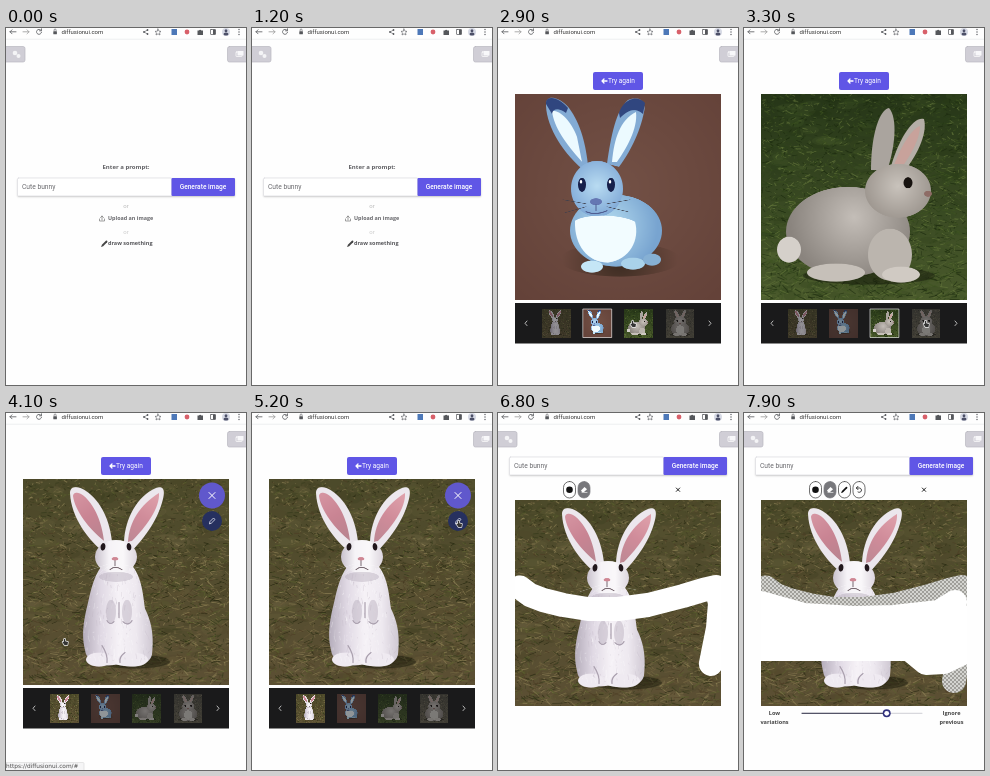
An HTML page with a canvas for the animation above (8 s loop, 240 by 357 pixels).

```html
<!DOCTYPE html>
<html lang="en">
<head>
<meta charset="utf-8">
<title>Image prompt demo</title>
<style>
html, body { margin: 0; width: 100%; height: 100%; overflow: hidden; background: #fff }
canvas { display: block; width: 100vw; height: 100vh }
</style>
</head>
<body>
<canvas id="stage"></canvas>
<script>
const W = 240, H = 357, LOOP = 8000, VIOLET = '#6056e6';
const canvas = document.getElementById('stage');
const ratio = Math.max(1, window.devicePixelRatio || 1);
canvas.width = W * ratio;
canvas.height = H * ratio;
const screen2d = canvas.getContext('2d');
let g = screen2d;

const clamp = v => Math.max(0, Math.min(1, v));
const ramp = (t, a, b) => clamp((t - a) / (b - a));
let seed = 7;
const rnd = () => (seed = seed * 16807 % 2147483647) / 2147483647;

function box(x, y, w, h, fill, r = 0, line) {
  g.beginPath();
  g.roundRect(x, y, w, h, r);
  if (fill) { g.fillStyle = fill; g.fill(); }
  if (line) { g.strokeStyle = line; g.lineWidth = .7; g.stroke(); }
}
function oval(x, y, rx, ry, fill, turn = 0) {
  g.beginPath();
  g.ellipse(x, y, rx, ry, turn, 0, 7);
  g.fillStyle = fill;
  g.fill();
}
function shape(d, fill) {
  g.fillStyle = fill;
  g.fill(new Path2D(d));
}
function line(d, color, width = 1) {
  g.strokeStyle = color;
  g.lineWidth = width;
  g.lineCap = g.lineJoin = 'round';
  g.stroke(new Path2D(d));
}
function text(s, x, y, font, color, align = 'left') {
  g.font = font;
  g.fillStyle = color;
  g.textAlign = align;
  g.textBaseline = 'middle';
  g.fillText(s, x, y);
}
const ui = (size, weight = 400) => `${weight} ${size}px Roboto, sans-serif`;
const bold = size => 'bold ' + size + 'px "Open Sans", sans-serif';

// Pictures are painted once, in the coordinates of the gallery view.
function picture(paint) {
  const c = document.createElement('canvas');
  c.width = c.height = 412;
  g = c.getContext('2d');
  g.scale(2, 2);
  g.translate(-17, -66);
  paint();
  g = screen2d;
  return c;
}
function glow(x, y, r, inner, outer) {
  const f = g.createRadialGradient(x, y, 0, x, y, r);
  f.addColorStop(0, inner);
  f.addColorStop(1, outer);
  return f;
}
function fade(x0, y0, x1, y1, ...colors) {
  const f = g.createLinearGradient(x0, y0, x1, y1);
  colors.forEach((c, i) => f.addColorStop(i / (colors.length - 1), c));
  return f;
}
function strands(count, colors, dx, dy, width) {
  for (let i = 0; i < count; i++) {
    const x = 17 + rnd() * 206, y = 66 + rnd() * 206, near = .6 + (y - 66) / 260;
    g.strokeStyle = colors[Math.floor(rnd() * colors.length)];
    g.lineWidth = width * (.6 + rnd());
    g.beginPath();
    g.moveTo(x, y);
    g.lineTo(x + (rnd() - .5) * dx * near, y + (rnd() - .5) * dy * near);
    g.stroke();
  }
}
function grass(top, bottom, blades) {
  box(17, 66, 206, 206, fade(0, 66, 0, 272, top, bottom));
  g.globalAlpha = .12;
  for (let i = 0; i < 260; i++) {
    oval(17 + rnd() * 206, 66 + rnd() * 206, 5 + rnd() * 9, 2 + rnd() * 4, blades[i % blades.length]);
  }
  g.globalAlpha = .6;
  strands(3600, blades, 15, 8, .7);
  g.globalAlpha = 1;
}

function whiteBunny() {
  grass('#4c4a2a', '#5c5034', ['#25270f', '#343a1a', '#7d7148', '#94875a', '#5b642e', '#4d3c24', '#6d5d3c']);
  oval(128, 249, 36, 7, 'rgba(25,25,10,.5)');
  const body = 'M95 154C88 164 85 176 82 190C78 206 75 222 79 237C80 250 96 255 110 252C126 256 143 254 146 242C148 224 146 210 139 196C137 182 136 166 127 154Z';
  const fur = fade(77, 0, 148, 0, '#b5adbb', '#e0d9e4', '#f6f2f7', '#eee9f0', '#cdc6d1');
  shape('M101 142C82 128 65 104 64 80C64 72 73 73 80 78C95 88 104 108 106 129H118C119 106 131 83 150 75C158 72 159 78 157 86C152 106 141 122 126 138Z', '#ece7ed');
  shape('M98 128C83 116 69 98 67 83C68 77 76 80 81 86C91 97 96 112 98 128Z', fade(68, 80, 98, 128, '#d695a2', '#c98493', '#b78590'));
  shape('M122 129C123 109 134 92 153 80C154 95 140 114 126 128Z', fade(153, 80, 122, 129, '#e0a2ac', '#d08c9a', '#bd8894'));
  shape(body, fur);
  oval(110, 144, 21, 17, fade(89, 0, 131, 0, '#c9c2cd', '#f6f3f7', '#faf8fa', '#ddd6df'));
  oval(93, 247, 13, 7, '#efeaf1');
  oval(127, 247, 15, 7, '#efeaf1');
  g.save();
  g.clip(new Path2D(body));
  g.globalAlpha = .35;
  strands(1600, ['#ffffff', '#b9afbe', '#ffffff'], 3, 12, .5);
  g.restore();
  oval(110, 164, 17, 5, 'rgba(175,166,180,.4)');
  oval(105, 199, 5, 12, 'rgba(165,156,172,.35)');
  oval(121, 199, 5, 12, 'rgba(165,156,172,.35)');
  line('M101 208Q104 213 108 209M117 209Q122 214 126 208M113 190V205M96 233Q102 242 101 250M119 240Q113 244 114 250', '#aaa0ae', 1.2);
  oval(97, 134, 2.4, 3.8, '#21171c', .15);
  oval(123, 134, 2.3, 3.8, '#21171c', -.15);
  oval(109, 146, 3.3, 1.8, '#cf8794');
  line('M109 148V153M104 157Q109 152 116 157', '#776870', 1);
  line('M103 151L82 158M103 153L86 166M117 152L138 156', 'rgba(255,255,255,.45)', .4);
}
function blueBunny() {
  box(17, 66, 206, 206, glow(120, 160, 150, '#735146', '#644239'));
  oval(122, 232, 60, 17, glow(122, 232, 58, '#382a20', 'rgba(65,45,33,0)'));
  const left = 'M84 141C62 122 47 95 48 74C50 66 63 70 71 80C83 96 88 118 90 138Z';
  const right = 'M109 136C113 108 118 82 130 72C142 67 149 74 146 84C142 105 131 126 121 139Z';
  shape(left, '#83abd4');
  shape(right, '#83abd4');
  shape('M84 134C68 116 56 100 54 83C62 82 73 93 79 109Z', '#ecfaff');
  shape('M114 134C116 111 122 92 138 84C140 101 128 121 119 134Z', '#ecfaff');
  shape('M48 76C47 67 60 68 70 80L68 85C61 80 55 80 54 86Z', '#30467f');
  shape('M121 85C126 70 140 67 147 75L145 86C137 79 130 82 122 90Z', '#30467f');
  oval(118, 203, 46, 36, glow(110, 198, 50, '#b5dcf0', '#78a4d0'));
  oval(99, 161, 26, 28, glow(99, 158, 30, '#b9dcf2', '#82abd8'));
  shape('M77 193C88 186 122 186 137 194C142 212 132 232 110 235C90 235 76 218 77 193Z', '#f2fcff');
  oval(94, 239, 11, 6, '#c5e6f6');
  oval(135, 236, 12, 6, '#a9d2ea');
  oval(154, 232, 9, 6, '#86b0d4');
  oval(84, 157, 4, 7, '#17204a');
  oval(113, 157, 4, 7, '#17204a');
  oval(83, 154, 1.2, 1.8, '#fff');
  oval(112, 154, 1.2, 1.8, '#fff');
  oval(98, 174, 6, 3.5, '#6577b3');
  line('M98 177V183M88 184Q98 188 109 183', '#4e5c90', 1);
  line('M88 176L65 172M88 179L67 185M109 176L132 172M109 179L130 184', '#40404d', .5);
}
function greyBunny() {
  grass('#263618', '#4a5a2c', ['#1a2a0e', '#3f5522', '#66783c', '#2f431a']);
  oval(125, 248, 66, 9, 'rgba(20,25,10,.5)');
  shape('M127 142C127 108 135 82 145 80C154 90 151 120 143 143Z', '#aaa49e');
  shape('M146 142C154 112 169 88 180 91C184 106 172 130 158 146Z', '#b5aea7');
  shape('M150 137C158 116 168 101 176 98C176 112 165 130 156 142Z', '#c8a29b');
  oval(104, 204, 62, 45, glow(110, 190, 65, '#c4beb8', '#8a847e'));
  oval(154, 163, 33, 27, glow(154, 158, 36, '#c9c3bc', '#9c958e'));
  oval(146, 227, 22, 26, '#bbb5ae');
  oval(92, 245, 29, 9, '#c6c0b9');
  oval(157, 247, 19, 8, '#d0cac3');
  oval(45, 222, 12, 13, '#d5d0ca');
  oval(164, 155, 4.5, 5.5, '#17120f');
  oval(184, 166, 4, 3, '#8e6c66');
}
function sittingBunny() {
  grass('#4a483e', '#605b4a', ['#30312a', '#75705c', '#545346', '#827a64']);
  oval(122, 250, 72, 12, 'rgba(20,20,15,.5)');
  shape('M108 132C80 116 76 86 84 72C102 80 116 108 119 134Z', '#a39d97');
  shape('M127 132C128 104 144 80 160 72C167 94 155 118 139 138Z', '#a39d97');
  shape('M107 124C90 112 84 92 88 82C101 92 110 110 112 126Z', '#bba09a');
  shape('M133 126C135 108 147 92 157 83C159 101 148 117 139 130Z', '#bba09a');
  oval(122, 210, 66, 52, glow(122, 198, 68, '#bab4ad', '#7d7771'));
  oval(122, 155, 42, 36, glow(122, 152, 44, '#c2bcb6', '#938d87'));
  oval(122, 218, 30, 34, '#cdc8c1');
  oval(96, 250, 23, 10, '#c5bfb8');
  oval(148, 250, 23, 10, '#c5bfb8');
  oval(101, 151, 5.5, 7.5, '#17120f');
  oval(143, 151, 5.5, 7.5, '#17120f');
  oval(122, 170, 6, 4, '#8e6c66');
}
const pictures = [whiteBunny, blueBunny, greyBunny, sittingBunny].map(picture);

const tile = document.createElement('canvas');
tile.width = tile.height = 4;
g = tile.getContext('2d');
box(0, 0, 4, 4, '#d4d4d0');
box(0, 0, 2, 2, '#a09f9a');
box(2, 2, 2, 2, '#a09f9a');
g = screen2d;
const checker = g.createPattern(tile, 'repeat');

function brushStroke(points, k, color) {
  if (k <= 0) return;
  let length = 0;
  g.beginPath();
  points.forEach(([x, y], i) => {
    g.lineTo(x, y);
    if (i) length += Math.hypot(x - points[i - 1][0], y - points[i - 1][1]);
  });
  g.save();
  g.lineWidth = 24;
  g.lineCap = g.lineJoin = 'round';
  g.strokeStyle = color;
  g.setLineDash([length * k, 2 * length]);
  g.stroke();
  g.restore();
}
const firstStroke = [[22, 174.5], [32, 182], [45, 187], [65, 192], [90, 196], [120, 196], [150, 192], [185, 183], [205, 177], [218, 174], [222, 190], [220, 215], [213, 250], [210, 268]];
const secondStroke = [[211, 189], [195, 199], [150, 204], [110, 205], [60, 202], [17, 190], [17, 214], [120, 216], [223, 205], [223, 226], [120, 236], [17, 236], [165, 236], [182, 250], [200, 249], [223, 238]];

function pencil(x, y, color) {
  line(`M${x - 2} ${y + 2}L${x + 2} ${y - 2}`, color, 1.8);
  line(`M${x - 3} ${y + 3}L${x - 2} ${y + 2}`, color, .8);
}
function cross(x, y, r, color) {
  line(`M${x - r} ${y - r}L${x + r} ${y + r}M${x + r} ${y - r}L${x - r} ${y + r}`, color, 1);
}

function browserBar() {
  const ink = '#55575b';
  line('M10 3.8H4M6 1.8L4 3.8L6 5.8', ink, .8);
  line('M17 3.8H23M21 1.8L23 3.8L21 5.8', '#999', .8);
  line('M35 2.3A2.5 2.5 0 1 0 35.5 4.3M35.5 .8V2.8H33.5', ink, .8);
  box(47.3, 3.3, 3.6, 3, ink, .5);
  line('M48.1 3V2A1 1 0 0 1 50.1 2V3', ink, .6);
  text('diffusionui.com', 55.5, 4.1, ui(6), '#333');
  line('M141.5 2L138 4L141.5 6', ink, .6);
  [[141.5, 2], [138, 4], [141.5, 6]].forEach(([x, y]) => oval(x, y, .9, .9, ink));
  line('M152 1L153 3.2L155 3.4L153.5 4.8L154 7L152 5.8L150 7L150.5 4.8L149 3.4L151 3.2Z', ink, .6);
  box(165.5, 1, 5.5, 6, '#4d78b8');
  oval(181, 4, 2.4, 2.4, '#d8606a');
  shape('M191.5 2.5H193A1.2 1.2 0 0 1 195.3 2.5H197V7H191.5Z', ink);
  box(204.5, 1.5, 5, 5, null, .5, ink);
  box(207, 1.5, 2.5, 5, ink);
  oval(220, 4, 4, 4, '#d7dae5');
  oval(220, 2.8, 1.4, 1.5, '#4c5068');
  oval(220, 6, 2.5, 1.5, '#4c5068');
  [1.5, 4, 6.5].forEach(y => oval(233, y, .7, .7, ink));
  box(0, 10.8, W, .7, '#e8e9eb');
}
function cornerButtons(withLeft) {
  const fill = '#d0ced6', rim = '#b9b8c0';
  if (withLeft) {
    box(-3, 18.5, 22, 15.5, fill, 2, rim);
    oval(9, 25, 2.3, 2.3, '#f4f4f6');
    oval(12.5, 28, 2, 2, '#f4f4f6');
  }
  box(221.5, 18.5, 22, 15.5, fill, 2, rim);
  box(230, 24, 6, 4.5, null, .5, '#fff');
  box(231.5, 23, 6, 4.5, '#f8f8fa', .5);
}
function promptField(y) {
  g.save();
  g.shadowColor = 'rgba(0,0,0,.22)';
  g.shadowBlur = 2 * ratio;
  g.shadowOffsetY = ratio;
  box(11.5, y, 217.5, 18, '#fff', 1);
  g.restore();
  box(11.5, y, 154, 18, '#fff', 1, '#dcdce0');
  box(165.5, y, 63.5, 18, VIOLET, 1);
  text('Cute bunny', 16, y + 9, ui(6.7), '#6a6a6e');
  text('Generate image', 197, y + 9, ui(6.6, 500), '#fff', 'center');
}
function promptPage() {
  cornerButtons(true);
  text('Enter a prompt:', 120, 139, bold(6), '#606064', 'center');
  promptField(150);
  text('or', 120, 178, ui(6), '#bbb', 'center');
  line('M93.5 191V193H98.5V191M96 192V188M94.5 189.5L96 188L97.5 189.5', '#777', .7);
  text('Upload an image', 102, 191, bold(5.4), '#66666a');
  text('or', 120, 204, ui(6), '#ccc', 'center');
  pencil(98.5, 215.5, '#444');
  text('draw something', 102, 216, bold(5.5), '#555559');
}
function galleryPage(t) {
  cornerButtons(false);
  box(95, 44, 50, 18, VIOLET, 2);
  line('M109 53H104M106 51L104 53L106 55', '#fff', 1.3);
  text('Try again', 110, 53, ui(6.6), '#fff');
  const pick = t < 2500 ? 0 : t < 3050 ? 1 : t < 3400 ? 2 : t < 3700 ? 3 : 0;
  const hover = t >= 2850 && t < 3050 ? 2 : -1;
  g.drawImage(pictures[pick], 17, 66, 206, 205.5);
  box(17, 275, 206, 40.5, '#1a1a1b');
  pictures.forEach((p, i) => {
    const x = 44 + i * 41.2;
    g.globalAlpha = i === pick || i === hover ? 1 : .55;
    g.drawImage(p, x, 281, 28.5, 28.5);
    g.globalAlpha = 1;
    if (i === pick && i) box(x, 281, 28.5, 28.5, null, 0, '#ddd');
  });
  line('M29 293L27 295.3L29 297.6M211 293L213 295.3L211 297.6', '#c9c9c9', .9);
  const k = 1 - (1 - ramp(t, 3850, 4050)) ** 3;
  if (k > 0) {
    oval(206, 82.5, 13 * k, 13 * k, '#6058cc');
    cross(206, 82.5, 3 * k, '#fff');
    oval(206, 108, 10 * k, 10 * k, '#26305f');
    line('M203.5 110.5L204 108.5L207.5 105L209 106.5L205.5 110Z', '#e7e9f5', .8);
  }
  if (t >= 3750 && t < 4450) {
    box(-1, 349.5, 79, 9, '#f5f5f6', 1, '#ddd');
    text('https://diffusionui.com/#', 0, 353.8, '5.85px "DejaVu Sans", sans-serif', '#4a4a4a');
  }
}
function toolButton(i, on) {
  const x = 71.5 + i * 14.5;
  box(x - 6, 68.5, 12, 16.5, on ? '#77777b' : '#fff', 6, on ? '#77777b' : '#333');
  const ink = on ? '#fff' : '#111';
  if (i === 0) oval(x, 76.7, 3.3, 3.3, ink);
  if (i === 1) {
    shape(`M${x - 3} 77.5L${x + .5} 74L${x + 3} 76.2L${x} 79H${x - 2}Z`, ink);
    line(`M${x - 2} 79.5H${x + 3}`, ink, .6);
  }
  if (i === 2) pencil(x, 76.7, ink);
  if (i === 3) line(`M${x - 2.5} 75H${x + .5}A2.2 2.2 0 1 1 ${x - 1} 79M${x - 1} 73.3L${x - 2.7} 75L${x - 1} 76.7`, ink, .8);
}
function editPage(t) {
  const released = t >= 7000;
  cornerButtons(true);
  promptField(44);
  for (let i = 0; i < (released ? 4 : 2); i++) toolButton(i, i === 1 && t >= 6000);
  cross(180, 76.7, 1.7, '#222');
  g.drawImage(pictures[0], 17, 87, 206, 205.5);
  g.save();
  g.beginPath();
  g.rect(17, 87, 206, 205.5);
  g.clip();
  brushStroke(firstStroke, ramp(t, 6250, 6835), released ? checker : '#fff');
  brushStroke(secondStroke, ramp(t, 7100, 7880), '#fff');
  g.restore();
  if (!released) return;
  text('Low', 30.5, 300.5, bold(5.6), '#444', 'center');
  text('variations', 30.5, 310, bold(5.6), '#444', 'center');
  text('Ignore', 207.5, 300.5, bold(5.6), '#444', 'center');
  text('previous', 207.5, 310, bold(5.6), '#444', 'center');
  line('M58 300.3H178', '#c5c5cc', .8);
  line('M58 300.3H140', '#34344c', 1);
  oval(142.7, 300.3, 4, 4, '#30307c');
  oval(142.7, 300.3, 2.4, 2.4, '#fff');
}

// Pointer route: time, x, y
const route = [[1900, 199, 158], [2000, 199, 161], [2450, 100, 293], [2750, 100, 293], [2950, 140, 293], [3300, 181, 293], [3600, 58, 293], [3850, 58, 293], [4100, 58, 226], [4600, 206, 108], [5500, 206, 108], [5850, 84, 77], [6050, 85, 77]];
function pointer(t) {
  const i = route.findIndex(p => p[0] > t);
  if (i < 1) return;
  const [t0, x0, y0] = route[i - 1], [t1, x1, y1] = route[i];
  const k = ramp(t, t0, t1), e = k * k * (3 - 2 * k);
  g.save();
  g.translate(x0 + (x1 - x0) * e, y0 + (y1 - y0) * e);
  const hand = 'M0 0V3L-1 2.5L-1.5 3.2L.5 6H3.5L4 3L1.2 2.2V0Z';
  line(hand, '#eee', 1.4);
  shape(hand, '#333');
  g.restore();
}

function draw(t) {
  g.setTransform(ratio, 0, 0, ratio, 0, 0);
  box(0, 0, W, H, '#fefefe');
  browserBar();
  if (t < 1400) promptPage();
  else if (t < 1900) cornerButtons(false);
  else if (t < 5500) galleryPage(t);
  else editPage(t);
  pointer(t);
}
const begin = performance.now();
function tick() {
  draw((performance.now() - begin) % LOOP);
  requestAnimationFrame(tick);
}
tick();
</script>
</body>
</html>
```
